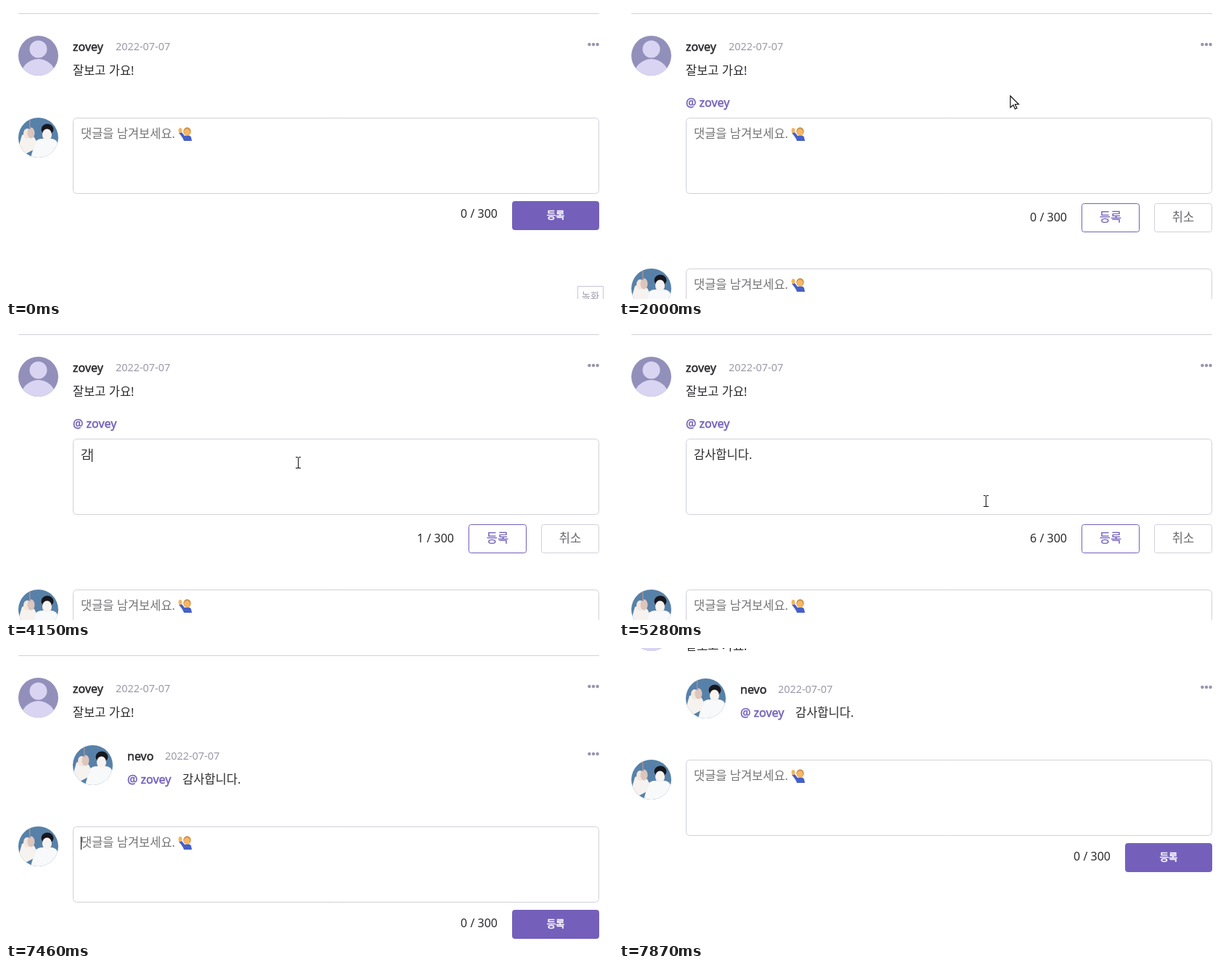
These frames come from a looping animation (836x404 px, 8 s). An HTML page with a canvas:

```html
<!DOCTYPE html>
<html lang="ko">
<head>
<meta charset="utf-8">
<title>댓글</title>
<style>
html, body { margin: 0; width: 100%; height: 100%; overflow: hidden; background: #fff; }
canvas { display: block; width: 836px; height: 404px; }
</style>
</head>
<body>
<canvas id="stage" width="836" height="404"></canvas>
<script>
const ctx = document.getElementById('stage').getContext('2d');
const LOOP = 8000;
const PURPLE = '#7460bb', BORDER = '#d0d0dd', INK = '#2b2b2f', GRAY = '#757578';
const WRITER = 'zovey', OWNER = 'nevo', DATE = '2022-07-07', THANKS = '감사합니다.';

// Times of the page states
const POPUP = 1340, REPLY = 1750, SENT = 6150, POSTED = 6410, SCROLL = 7620;

const typed = [[2800, 'r'], [2930, 'rk'], [3000, 'rka']];
['rk', 'r', '', 'ㄱ', '가', '감', '감ㅅ', '감사'].forEach((s, i) => typed.push([3490 + i * 113, s]));
['감사하', '감사합', '감사합니', '감사합니다', THANKS].forEach((s, i) => typed.push([4410 + i * 85, s]));

const caretOn = [[2190, 2720], [2800, 5280], [5810, 6150], [7130, 7660]];

// Pointer tracks: time, x, y
const tracks = [
  [[530, 830, 50], [800, 802, 43], [1069, 802, 43], [1070, 796, 46], [1200, 802, 50],
   [1470, 802, 50], [1660, 793, 84], [1790, 793, 84], [2000, 540, 124], [2130, 404, 187],
   [2260, 402, 187], [5279, 402, 187], [5280, 505, 240], [5350, 505, 240], [5550, 640, 289],
   [5750, 709, 301], [6080, 690, 298], [SENT, 690, 298]],
  [[7070, 748, 312], [7260, 743, 309], [7399, 743, 309], [7400, 788, 309], [7460, 788, 309]]
];

const HAND = new Path2D('M-2 2Q0-1 2 2V9Q5 7 6 10Q9 9 9.5 11Q12 10.5 12 13V17L10 21V24H0V22L-6 15Q-6 12-4 13L-2 15Z');
const ARROW = new Path2D('M0 0V16L4 12.5L6.5 18L9 17L6.5 11.5H11.5Z');
const BODY = new Path2D('M17 55L23 34Q26 29 33 29H46Q54 30 56 40V56H17Z');
const ARM = new Path2D('M5 24Q13 20 22 27L25 33L21 44L8 51L1 38Z');

function runs(s, size) {
  return (s.match(/[ㄱ-ㅎ가-힣]+|[^ㄱ-ㅎ가-힣]+/g) || []).map(part => ({
    part,
    font: /[ㄱ-ㅎ가-힣]/.test(part)
      ? `${size * 1.032}px "Noto Sans CJK KR", "Noto Sans CJK", sans-serif`
      : `${size}px "Noto Sans", sans-serif`
  }));
}

function measure(s, size) {
  return runs(s, size).reduce((w, r) => {
    ctx.font = r.font;
    return w + ctx.measureText(r.part).width;
  }, 0);
}

// align: 0 left, 0.5 centre, 1 right
function text(s, x, y, color, { size = 16, bold = 0, align = 0 } = {}) {
  x -= measure(s, size) * align;
  ctx.fillStyle = ctx.strokeStyle = color;
  ctx.lineWidth = bold;
  for (const r of runs(s, size)) {
    ctx.font = r.font;
    ctx.fillText(r.part, x, y);
    if (bold) ctx.strokeText(r.part, x, y);
    x += ctx.measureText(r.part).width;
  }
}

function box(x, y, w, h, r, stroke, fill = '#fff') {
  ctx.beginPath();
  ctx.roundRect(x + 0.5, y + 0.5, w - 1, h - 1, r);
  ctx.fillStyle = fill;
  ctx.fill();
  ctx.strokeStyle = stroke;
  ctx.lineWidth = 1;
  ctx.stroke();
}

function oval(x, y, rx, ry, color) {
  ctx.beginPath();
  ctx.ellipse(x, y, rx, ry, 0, 0, Math.PI * 2);
  ctx.fillStyle = color;
  ctx.fill();
}

function fillPath(path, color) {
  ctx.fillStyle = color;
  ctx.fill(path);
}

function avatar(x, y, color, paint) {
  ctx.save();
  ctx.translate(x, y);
  oval(27.5, 27.5, 27.5, 27.5, color);
  ctx.clip();
  paint();
  ctx.restore();
}

function plainAvatar(x, y) {
  avatar(x, y, '#9290ba', () => {
    oval(27.5, 18.5, 12, 12, '#d8d4f2');
    oval(27.5, 57, 24.5, 25, '#d8d4f2');
  });
}

function ownerAvatar(x, y) {
  avatar(x, y, '#5781a8', () => {
    fillPath(BODY, '#f8f9fa');
    fillPath(ARM, '#f5f2ef');
    oval(12, 22, 5, 7, '#f3e6dc');
    oval(17.5, 21, 5, 7.5, '#dcc6bd');
    ctx.fillStyle = '#a08f98';
    ctx.fillRect(15, 2, 1.5, 14);
    oval(40, 16, 8.5, 7.5, '#17171d');
    oval(39.5, 23.5, 6.5, 8, '#f7f3f1');
  });
}

function emoji(x, y) {
  ctx.save();
  ctx.translate(x, y);
  fillPath(new Path2D('M1 8L5 7L9 12Q16 10 18 14L19 19H8Q7 15 1 8Z'), '#4560c8');
  oval(3, 4.5, 2.5, 3.5, '#f3b45f');
  oval(12.5, 6, 5.2, 5.8, '#c98d45');
  oval(12.3, 7, 4.3, 4.7, '#f6b765');
  ctx.restore();
}

function dots(y) {
  for (let i = 0; i < 3; i++) oval(803.4 + i * 5.6, y, 2.2, 2.2, '#9795ad');
}

function placeholder(y) {
  text('댓글을 남겨보세요.', 103, y + 28, GRAY);
  emoji(237, y + 13);
}

function caret(x, y) {
  ctx.fillStyle = '#000';
  ctx.fillRect(Math.round(x), y + 14, 1, 18);
}

function header(x, y, name, dateX) {
  text(name, x, y + 21, INK, { bold: 0.5 });
  text(DATE, dateX, y + 20, '#9b99a8', { size: 14.4 });
  dots(y + 12);
}

function mainForm(y, nudge) {
  ownerAvatar(17, y);
  box(92, y, 725, 105, 5, BORDER);
  placeholder(y);
  text('0 / 300', 677, y + 138 + nudge, INK, { align: 1 });
  box(697, y + 115, 120, 40, 3, PURPLE, PURPLE);
  text('등록', 757, y + 139, '#fff', { size: 13, bold: 0.6, align: 0.5 });
}

function replyForm(value, showCaret) {
  text('@ ' + WRITER, 92, 139, PURPLE, { bold: 0.5 });
  box(92, 154, 725, 105, 5, BORDER);
  if (value) text(value, 103, 182, INK);
  else placeholder(154);
  if (showCaret) caret(103 + measure(value, 16), 154);
  text(value.length + ' / 300', 617, 297, INK, { align: 1 });
  box(637, 272, 80, 40, 3, PURPLE);
  text('등록', 677, 297, PURPLE, { bold: 0.2, align: 0.5 });
  box(737, 272, 80, 40, 3, BORDER);
  text('취소', 777, 297, '#66666c', { align: 0.5 });
}

function pointerAt(t) {
  const keys = tracks.find(k => t >= k[0][0] && t < k[k.length - 1][0]);
  if (!keys) return null;
  const i = keys.findIndex(k => k[0] > t);
  const [t0, x0, y0] = keys[i - 1], [t1, x1, y1] = keys[i];
  const u = (t - t0) / (t1 - t0);
  return [Math.round(x0 + (x1 - x0) * u), Math.round(y0 + (y1 - y0) * u)];
}

function pointer(t) {
  const at = pointerAt(t);
  if (!at) return;
  const [x, y] = at;
  const within = (l, top, r, b) => x >= l && x <= r && y >= top && y <= b;
  const replying = t >= REPLY && t < SENT;
  const link = within(795, 42, 822, 64) || (t < REPLY && within(765, 64, 817, 101)) ||
    (replying && within(637, 272, 717, 312));
  ctx.save();
  ctx.translate(x, y);
  if ((replying && within(92, 154, 817, 259)) || t >= POSTED) {
    ctx.fillStyle = '#111';
    ctx.fillRect(0, -7, 1, 15);
    for (const edge of [-8, 7]) {
      ctx.fillRect(-3, edge, 3, 1);
      ctx.fillRect(1, edge, 3, 1);
    }
  } else {
    const shape = link ? HAND : ARROW;
    fillPath(shape, '#fff');
    ctx.strokeStyle = '#111';
    ctx.lineWidth = 1.2;
    ctx.stroke(shape);
    if (link) {
      ctx.beginPath();
      for (const kx of [2, 5.7, 9.2]) {
        ctx.moveTo(kx, 9);
        ctx.lineTo(kx, 13);
      }
      ctx.stroke();
    }
  }
  ctx.restore();
}

function draw(t) {
  const posted = t >= POSTED;
  const replying = t >= REPLY && t < SENT;
  const showCaret = caretOn.some(([a, b]) => t >= a && t < b);
  const u = t < 7660 ? 0 : Math.min(1, (t - SCROLL) / 250);
  const scroll = Math.round(92 * (1 - (1 - u) ** 2));

  ctx.fillStyle = '#fff';
  ctx.fillRect(0, 0, 836, 404);
  ctx.save();
  ctx.translate(0, -scroll);

  ctx.fillStyle = '#d2d2d8';
  ctx.fillRect(17, 10, 800, 1);
  plainAvatar(17, 41);
  header(92, 41, WRITER, 151);
  text('잘보고 가요!', 92, 95, INK);

  if (replying) {
    const last = typed.filter(k => k[0] <= t).pop();
    replyForm(last ? last[1] : '', showCaret);
  }
  if (posted) {
    ownerAvatar(92, 134);
    header(167, 134, OWNER, 219);
    text('@ ' + WRITER, 167, 187, PURPLE, { bold: 0.5 });
    text(THANKS, 243, 187, INK);
  }
  const formY = replying ? 362 : posted ? 246 : 154;
  mainForm(formY, posted ? 1 : 0);
  if (posted && showCaret) caret(103, formY);
  ctx.restore();

  if (t >= POPUP && t < REPLY) {
    box(765, 69, 52, 32, 3, BORDER);
    text('답글', 791, 89, INK, { size: 11.8, align: 0.5 });
  }
  if (t < 70) {
    box(787, 386, 36, 30, 0, '#c6c6d6');
    text('녹화', 805, 405, '#9c9cae', { size: 12.8, align: 0.5 });
  }
  pointer(t);
}

const start = performance.now();
function tick() {
  draw((performance.now() - start) % LOOP);
  requestAnimationFrame(tick);
}
tick();
</script>
</body>
</html>
```
